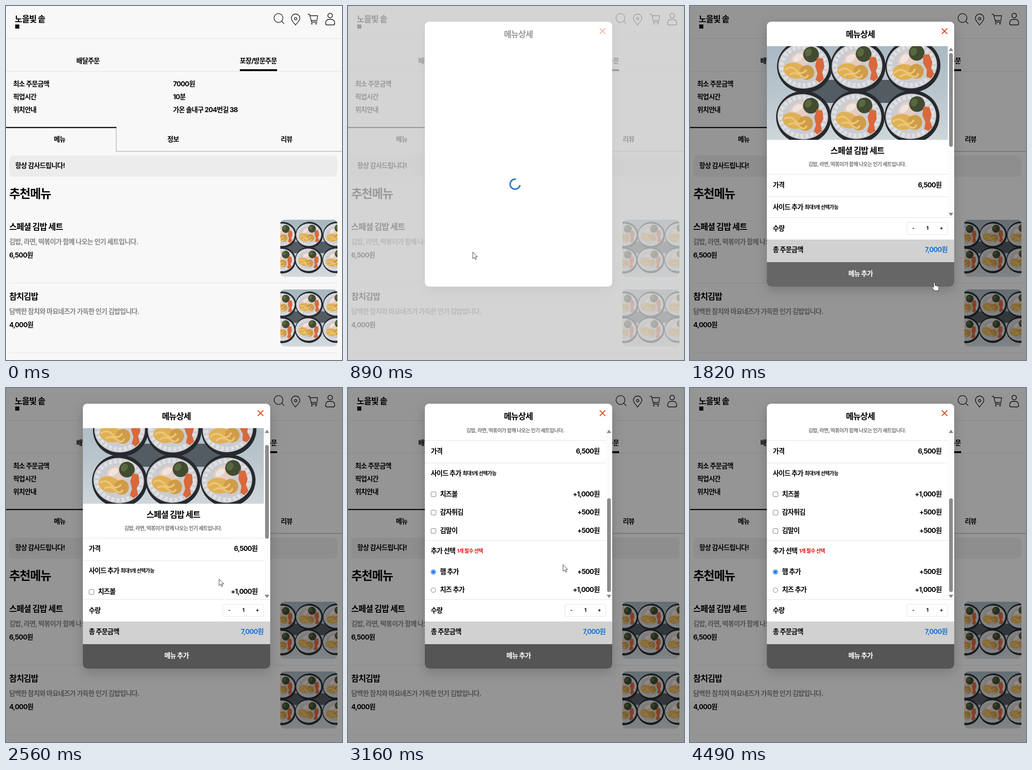
Animation, 730 px wide and 767 px high, one loop 4.9 s. Source, as an HTML page:

```html
<!DOCTYPE html>
<html lang="ko">
<head>
<meta charset="utf-8">
<title>메뉴상세</title>
<style>
html, body { margin: 0; height: 100%; overflow: hidden; background: #f8f8f8; }
svg { display: block; width: 100vw; height: 100vh; }
text { font: 700 14.5px Inter, "Noto Sans CJK KR", "Noto Sans CJK", sans-serif; letter-spacing: -.05em; }
.m { text-anchor: middle; }
.e { text-anchor: end; }
.s { font-size: 11px; }
.l { font-size: 18px; }
.xl { font-size: 26px; }
.icon { fill: none; stroke: #111; stroke-width: 1.3; stroke-linecap: round; stroke-linejoin: round; }
.box { fill: #fff; stroke: #767676; }
#panel { filter: drop-shadow(0 8px 12px rgba(0, 0, 0, .18)); }
</style>
</head>
<body>
<svg id="stage" viewBox="0 0 730 767"></svg>
<script>
const text = (x, y, s, cls = '', fill = '#000') =>
  `<text x="${x}" y="${y}" class="${cls}" fill="${fill}">${s}</text>`;
const rect = (x, y, w, h, fill, more = '') =>
  `<rect x="${x}" y="${y}" width="${w}" height="${h}" fill="${fill}" ${more}/>`;
const oval = (x, y, rx, ry, fill, turn = 0, more = '') =>
  `<ellipse rx="${rx}" ry="${ry}" fill="${fill}" transform="translate(${x} ${y}) rotate(${turn})" ${more}/>`;
const line = (y, x1, x2, color = '#e2e2e2') => rect(x1, y, x2 - x1, 1, color);

// One slice: seaweed, rice, then the fillings.
const roll = `<g id="roll">
  ${oval(1, 1, 60, 57, '#26292d')}${oval(-1, 0, 55, 49, '#cbccd0')}
  ${oval(-1, 0, 48, 42, 'none', 0, 'stroke="#dfe0e3" stroke-width="9" stroke-dasharray="7 4"')}
  ${oval(-8, -14, 22, 17, '#e6cdc2', -25)}${oval(-14, -18, 12, 7, '#f0e4df', -35)}
  ${oval(-20, 10, 25, 17, '#dfb055', 12)}${oval(6, 14, 16, 16, '#cf9c48')}
  ${oval(15, -25, 17, 17, '#414b31', 15)}${oval(9, -29, 7, 9, '#59683f', 30)}
  <path d="M28-18l13 2 3 18-5 12 4 14-10 8-8-6 4-14-5-16z" fill="#d9693c"/>
  <path d="M-42 8q14-10 25 2t22-2M-32 19q14-8 25 2t16-2" fill="none" stroke="#ecc676" stroke-width="4"/>
</g>`;
const places = [[81, 65, 0], [197, 65, -4], [316, 64, -12], [79, 175, 4], [195, 174, 5], [314, 174, -6]];
const photo = `<symbol id="photo" viewBox="0 0 393 248">
  ${rect(0, 0, 393, 248, 'url(#plate)')}${rect(85, 95, 225, 50, '#535c62')}
  ${places.map(([x, y, a]) => `<use href="#roll" transform="translate(${x} ${y}) rotate(${a})"/>`).join('')}
</symbol>`;

const thumb = y => `<svg x="596" y="${y}" width="124" height="124" viewBox="0 0 124 124">
  <g clip-path="url(#thumbClip)"><use href="#photo" x="-36" width="196" height="124"/></g></svg>`;
const item = (y, name, about, price) =>
  text(7, y + 22, name, 'l') + text(7, y + 53, about, '', '#858585') +
  text(7, y + 81.5, price) + thumb(y) + line(y + 137, 7, 720);

const icons = `<g class="icon">
  <circle cx="592" cy="26" r="9.7"/><path d="M599 33l5 5"/>
  <path d="M629 41.500C625 35 620 32 620 26.500a9.200 9.200 0 0 1 18.500 0C638.500 32 633 35 629 41.500z"/><circle cx="629.300" cy="27.500" r="2.600"/>
  <path d="M656 18h3.500l4.500 17h12M660 21h17l-1.500 10.500h-12.500"/>
  <circle cx="664.500" cy="38.500" r=".8" fill="#111"/><circle cx="673.500" cy="38.500" r=".8" fill="#111"/>
  <g stroke-width="1.500"><circle cx="704.300" cy="20.800" r="5"/>
  <path d="M694.500 38v-1.500c0-4.500 3-7.500 7-7.500h5.500c4 0 7 3 7 7.500V38q0 3-3 3h-13.500q-3 0-3-3z"/></g>
</g>`;

const page = rect(0, 0, 730, 767, '#f8f8f8') +
  text(52, 35, '노을빛 솥', 'm l') + rect(20, 40, 9, 9, '#111') + icons + line(70, 0, 730) +
  text(178, 123.5, '배달주문', 'm') + text(548, 123.5, '포장/방문주문', 'm') +
  line(141, 0, 730) + rect(508, 137, 81, 4, '#000') +
  [['최소 주문금액', '7000원'], ['픽업시간', '10분'], ['위치안내', '가온 솔내구 204번길 38']]
    .map(([a, b], i) => text(15.5, 173.5 + i * 28.3, a) + text(363, 173.5 + i * 28.3, b)).join('') +
  rect(0, 262, 240, 2.5, '#111') + rect(239, 264, 1, 51, '#999') + line(314.5, 239, 730, '#999') +
  ['메뉴', '정보', '리뷰'].map((s, i) => text(116.5 + i * 246.5, 293.5, s, 'm')).join('') +
  rect(7, 324, 713, 46, '#ececec', 'rx="9"') + text(20, 350.5, '항상 감사드립니다!') +
  text(7, 416, '추천메뉴', 'xl') +
  item(463, '스페셜 김밥 세트', '김밥, 라면, 떡볶이가 함께 나오는 인기 세트입니다.', '6,500원') +
  item(614, '참치김밥', '담백한 참치와 마요네즈가 가득한 인기 김밥입니다.', '4,000원');

const option = (y, mark, name, price) => mark + text(200, y + 5.5, name) + text(546.5, y + 5.5, price, 'e');
const check = y => rect(180.5, y - 4, 10.5, 10.5, '#fff', 'class="box" rx="2"');
const radio = (y, on) => on
  ? `<circle cx="185.500" cy="${y + 1.5}" r="5" fill="#fff" stroke="#1f7af0" stroke-width="1.200"/><circle cx="185.500" cy="${y + 1.5}" r="3.400" fill="#1f7af0"/>`
  : `<circle cx="185.500" cy="${y + 1.5}" r="5" class="box"/>`;

const details = `<g clip-path="url(#scrollClip)"><g id="list">
  <svg x="167" y="87" width="393" height="203"><use href="#photo" y="-22" width="393" height="248"/></svg>
  ${text(363.5, 320, '스페셜 김밥 세트', 'm l')}
  ${text(363.5, 347, '김밥, 라면, 떡볶이가 함께 나오는 인기 세트입니다.', 'm s', '#757575')}
  ${line(364, 167, 560)}${text(180, 392.5, '가격')}${text(546.5, 392.5, '6,500원', 'e')}
  ${line(413, 167, 560)}${text(180, 440.5, '사이드 추가')}${text(249, 439.5, '최대1개 선택가능', 's')}
  ${option(480, check(480), '치즈볼', '+1,000원')}
  ${option(519.7, check(519.7), '감자튀김', '+500원')}
  ${option(559.5, check(559.5), '김말이', '+500원')}
  ${line(581, 167, 560)}${text(180, 608.5, '추가 선택')}${text(237, 607.5, '1개 필수 선택', 's', '#e60d0d')}
  ${option(648, radio(648, true), '햄 추가', '+500원')}
  ${option(687.5, radio(687.5), '치즈 추가', '+1,000원')}
</g></g>
${rect(560, 87, 14, 371, '#fcfcfc')}
<path d="M562 97.500l5-7 5 7zM562 448l5 7 5-7z" fill="#858585"/>
${rect(563, 102, 8, 203, '#8b8b8b', 'id="bar" rx="4"')}
${line(458, 167, 574)}${text(180, 486.5, '수량')}
${rect(471, 468.5, 89, 27, '#fff', 'rx="3.5" stroke="#dee2e6"')}
${text(485, 485, '-', 'm s')}${text(515.5, 485, '1', 'm s')}${text(546, 485, '+', 'm s')}
${rect(167, 506, 407, 49, '#d1d1d1')}${text(180, 533, '총 주문금액')}
${text(559.5, 533, '7,000원', 'e', '#1c72d0')}
${rect(167, 555, 407, 53, '#555', 'id="add"')}${text(370.5, 585, '메뉴 추가', 'm', '#fff')}`;

stage.innerHTML = `<defs>
  <linearGradient id="plate" x2="0" y2="1"><stop stop-color="#a6b7c0"/><stop offset=".5" stop-color="#b9c5cc"/><stop offset="1" stop-color="#d3dade"/></linearGradient>
  <clipPath id="thumbClip">${rect(0, 0, 124, 124, '#000', 'rx="9"')}</clipPath>
  <clipPath id="modalClip">${rect(167, 34, 407, 574, '#000', 'rx="9"')}</clipPath>
  <clipPath id="scrollClip">${rect(167, 87, 393, 371, '#000')}</clipPath>
  ${roll}${photo}</defs>
${page}
<g id="modal">
  ${rect(0, 0, 730, 767, '#000', 'opacity=".4"')}
  ${rect(167, 34, 407, 574, '#fff', 'id="panel" rx="9"')}
  ${text(370, 68, '메뉴상세', 'm l')}
  <path d="M547 48.500l12 12M559 48.500l-12 12" stroke="#d4481c" stroke-width="2"/>
  <g id="details" clip-path="url(#modalClip)">${details}</g>
</g>
<g id="loader">
  ${rect(0, 0, 730, 767, '#fff', 'opacity=".6"')}
  <circle id="spinner" r="10.800" fill="none" stroke="#2f78cc" stroke-width="3.200" pathLength="4" stroke-dasharray="3 1"/>
</g>
<g id="cursor" fill="#fff" stroke="#222" stroke-width=".9" stroke-linejoin="round">
  <path id="arrow" d="M0 0V14.500l3.500-3.200 2.300 5 2.200-1-2.300-4.900H10z"/>
  <path id="hand" d="M-1.500 10V1.500a1.500 1.500 0 0 1 3 0V7c2-1 3 0 3.200.8 1.500-.6 2.600 0 2.800 1 1.400-.3 2.200.3 2.200 1.400V13c0 2-1.500 3-1.500 5H0c0-2-5-5-5-8 1-1.500 2.500 0 3.500 1z"/>
</g>`;

const $ = id => document.getElementById(id);
const show = (id, on) => $(id).setAttribute('display', on ? 'inline' : 'none');
const clamp = v => Math.max(0, Math.min(1, v));

// time, x, y
const path = [
  [180, 600, 750], [420, 370, 484], [660, 271, 533], [890, 271, 533], [950, 274, 537], [1000, 274, 537],
  [1150, 698, 674], [1370, 698, 674], [1820, 531, 599], [1890, 525, 592], [1960, 525, 592],
  [2360, 463, 422], [2490, 463, 422], [2760, 463, 391], [3030, 463, 391], [3250, 470, 377],
  [3500, 486, 395], [3570, 486, 396], [3700, 488, 400], [4090, 495, 498], [4150, 495, 498],
  [4240, 500, 474], [4490, 700, 636]];
const scroll = [[2490, 0], [2760, 149.5], [2960, 251]];

function at(keys, t) {
  const i = keys.findIndex(k => k[0] > t);
  if (i < 0) return keys.at(-1).slice(1);
  if (!i) return keys[0].slice(1);
  const a = keys[i - 1], b = keys[i], p = (t - a[0]) / (b[0] - a[0]);
  return a.slice(1).map((v, j) => v + (b[j + 1] - v) * p);
}

function draw(now) {
  const t = now % 4900, open = t >= 740, loading = open && t < 950;
  const fade = clamp((t - 740) / 120);
  show('modal', open);
  show('loader', loading);
  show('details', t >= 950);
  $('modal').setAttribute('opacity', fade);
  $('loader').setAttribute('opacity', fade);
  $('spinner').setAttribute('transform', `translate(363 386) rotate(${10 + (t - 890) * .36})`);

  const [s] = at(scroll, t);
  $('list').setAttribute('transform', `translate(0 ${-s})`);
  $('bar').setAttribute('y', 102 + s * .546);

  const [x, y] = at(path, t);
  const onAdd = t >= 950 && x > 167 && x < 574 && y > 555 && y < 608;
  const pointing = !open || onAdd;
  $('add').setAttribute('fill', onAdd ? '#666' : '#555');
  $('cursor').setAttribute('transform', `translate(${x} ${y})`);
  show('cursor', t >= 180 && t < 4490);
  show('hand', pointing);
  show('arrow', !pointing);
  requestAnimationFrame(draw);
}
requestAnimationFrame(draw);
</script>
</body>
</html>
```
